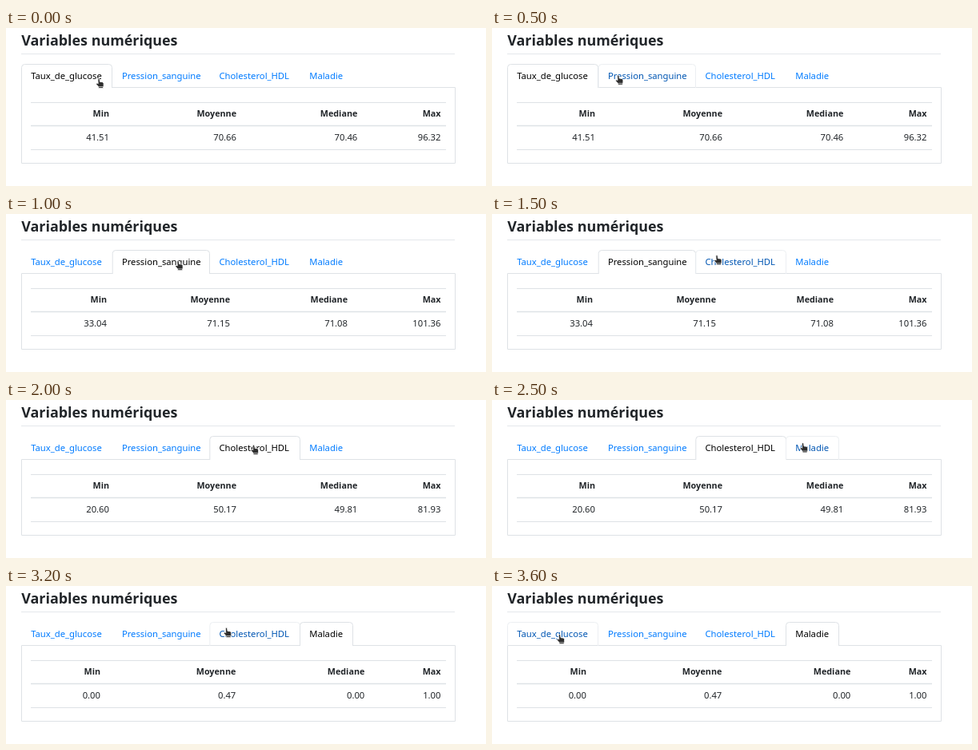
Recreate the animation shown at these times as an HTML page. Size 600 by 198 pixels, loop 4 s.

```html
<!DOCTYPE html>
<html lang="fr">
<head>
<meta charset="utf-8">
<title>Variables numériques</title>
<style>
  html, body { margin: 0; width: 100%; height: 100%; overflow: hidden; background: #fff; }
  svg { display: block; width: 600px; height: 198px; font: 11.25px "Noto Sans", "Open Sans", sans-serif; fill: #212529; }
  .title { font-size: 17.9px; font-weight: 700; }
  .line { fill: none; stroke: #dee2e6; }
  .head { font-size: 10.75px; font-weight: 700; }
  .cell { text-anchor: end; }
  .tab path { fill: none; stroke: none; }
  .tab text { fill: #007bff; }
  .tab.hover path { stroke: #eceff2; }
  .tab.hover text { fill: #0056b3; }
  .tab.active path { fill: #fff; stroke: #dee2e6; }
  .tab.active text { fill: #000; }
</style>
</head>
<body>
<svg viewBox="0 0 600 198">
  <text class="title" x="19.3" y="22">Variables numériques</text>
  <path class="line" stroke-opacity=".8" d="M19 32.5H561"/>
  <path class="line" d="M19.5 74.5H561.5V169.5H19.5Z"/>
  <path class="line" d="M31 93.5H550M31 152.5H550"/>
  <path class="line" stroke-width="1.5" d="M31 122.5H550"/>
  <g id="tabs"></g>
  <g id="table"></g>
  <g id="hand">
    <path fill="#2e2e2e" stroke="#fff" stroke-width=".8" stroke-linejoin="round"
      d="M2.3 1Q3.6-.5 4.6 1L5 4.4Q8.8 4.2 9.6 6V9.3L8.8 12.4H3.3L2.9 10.3L.3 7.5Q.2 5.8 1.6 6L2.7 6.7Z"/>
    <path fill="none" stroke="#ddd" stroke-width=".7" d="M3.6 10.5H8.8"/>
  </g>
</svg>
<script>
  const LOOP = 4000, STEP = 100;
  const tabs = [
    { label: "Taux_de_glucose", x: 19.5, end: 132.5, ends: [129, 288, 439.3, 543.5], values: ["41.51", "70.66", "70.46", "96.32"] },
    { label: "Pression_sanguine", x: 133.2, end: 254.5, ends: [126, 280, 427, 543.5], values: ["33.04", "71.15", "71.08", "101.36"] },
    { label: "Cholesterol_HDL", x: 254.8, end: 367.5, ends: [129, 288, 439.3, 543.5], values: ["20.60", "50.17", "49.81", "81.93"] },
    { label: "Maladie", x: 367.5, end: 433.5, ends: [118, 287.3, 448.3, 543.5], values: ["0.00", "0.47", "0.00", "1.00"] }
  ];
  const heads = ["Min", "Moyenne", "Mediane", "Max"];
  const clicks = [0, 700, 1700, 2700];

  // Pointer route: time, x, y
  const route = [
    [0, 112.5, 63], [500, 154.3, 58.8], [600, 154.3, 58.8], [1000, 211.5, 58.3],
    [1200, 240.5, 55], [1500, 277.5, 51.3], [1600, 277.5, 51.3], [2000, 306, 56],
    [2200, 357.5, 57], [2500, 385, 53.5], [2600, 385, 53.5], [2900, 362.3, 51.3],
    [3000, 346, 49.5], [3200, 272, 52], [3500, 104, 58], [3600, 81, 60.3], [4000, 81, 60.3]
  ];

  const el = id => document.getElementById(id);

  el("tabs").innerHTML = tabs.map(({ label, x, end }) =>
    `<g class="tab"><path d="M${x} 75V49.5q0-4 4-4H${end - 4}q4 0 4 4V75"/>
     <text x="${x + 11.7}" y="64.4">${label}</text></g>`).join("");
  const tabEls = [...el("tabs").children];

  function showTable({ ends, values }) {
    el("table").innerHTML = ends.map((x, i) =>
      `<text class="cell head" x="${x}" y="111.4">${heads[i]}</text>
       <text class="cell" x="${x}" y="141">${values[i]}</text>`).join("");
  }

  function pointerAt(t) {
    const i = route.findIndex(p => p[0] > t);
    const [t0, x0, y0] = route[i - 1], [t1, x1, y1] = route[i];
    const k = (t - t0) / (t1 - t0);
    return [x0 + (x1 - x0) * k, y0 + (y1 - y0) * k];
  }

  let shown = -1;
  function draw(now) {
    const t = Math.floor(now % LOOP / STEP) * STEP;
    const [x, y] = pointerAt(t);
    const active = clicks.filter(c => c <= t).length - 1;
    const tip = x + 3.5;
    if (active !== shown) showTable(tabs[shown = active]);
    tabEls.forEach((g, i) => {
      g.classList.toggle("active", i === active);
      g.classList.toggle("hover", i !== active && tip > tabs[i].x && tip <= tabs[i].end);
    });
    el("hand").setAttribute("transform", `translate(${x} ${y})`);
    requestAnimationFrame(draw);
  }
  draw(performance.now());
</script>
</body>
</html>
```
